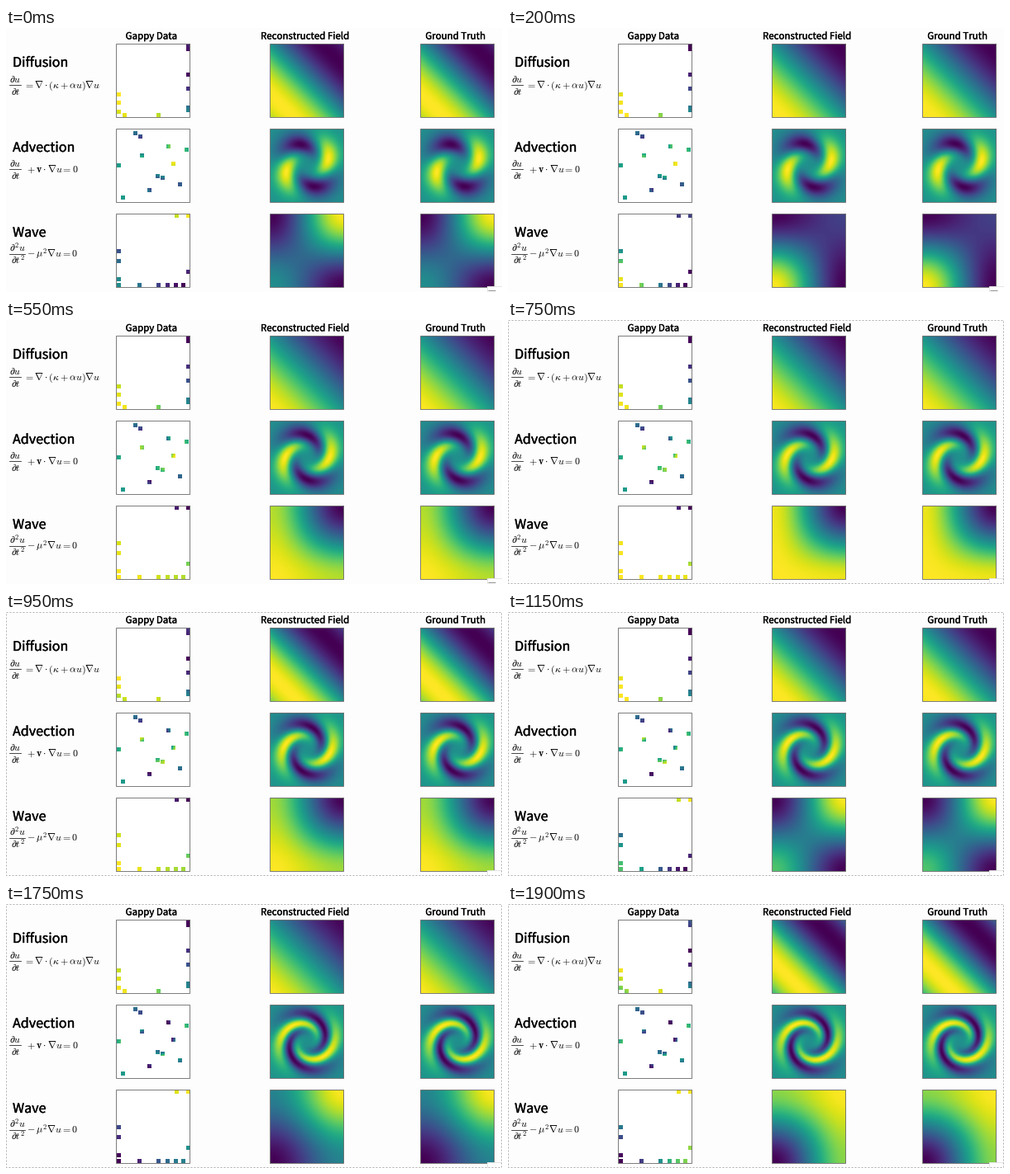
A matplotlib script that plays this animation: 600 by 320 pixels, repeating every 1950 ms.

```python
import numpy as np
import matplotlib.pyplot as plt
from matplotlib.animation import FuncAnimation
from matplotlib.patches import Rectangle
from matplotlib.patheffects import withStroke

W, H, DPI = 600, 320, 100
FRAMES, STEP = 39, 50
PX = 72 / DPI
N = 89
COLS = (133.5, 319.5, 501.5)
ROWS = [19.5 + 103 * i for i in range(3)]
TEXT_FONT = "Noto Sans CJK JP"
TAU = 2 * np.pi
plt.rcParams["mathtext.fontset"] = "cm"

axis = (np.arange(N) + .5) / N
X, Y = np.meshgrid(axis, axis[::-1])
CX, CY = np.cos(np.pi * X), np.cos(np.pi * Y)
R2 = (X - .5)**2 + (Y - .5)**2
THETA = np.arctan2(Y - .5, X - .5)


def diffusion(t):
    """A sharp diagonal band that relaxes and restarts every second."""
    age = (t + 100) % 1000
    k = 1.45 + 1.35 * np.exp(-age / 200)
    return .5 + .5 * np.sin(k * (1 - X - Y))


def advection(t):
    """Four lobes wound up by a vortex."""
    turn = np.radians(70 + .088 * t) * np.exp(-R2 / .31**2)
    rho = R2 / .3**2
    lobe = (rho * np.exp(1 - rho))**1.5
    return .5 + .5 * lobe * np.sin(2 * (THETA + turn))


def wave(t):
    """Two standing modes, rescaled to the full colour range."""
    period = 2060
    p = np.sin(TAU * (t - 100) / period)
    q = -.9 * np.sin(TAU * (t - 320) * np.sqrt(2) / period)
    u = p * (CX + CY) + q * CX * CY
    return (u - u.min()) / np.ptp(u)


def edges(left, bottom, right, top=()):
    lo, hi = 2, N - 3
    return ([(lo, y) for y in left] + [(x, hi) for x in bottom]
            + [(hi, y) for y in right] + [(x, lo) for x in top])


def sensor_mask(points):
    mask = np.zeros((N, N))
    for x, y in points:
        mask[max(y - 2, 0):y + 3, max(x - 2, 0):x + 3] = 1
    return mask


def colors(field, alpha=1):
    rgba = plt.cm.viridis(np.clip(field, 0, 1))
    rgba[..., 3] = alpha
    return rgba


SENSORS = (
    edges((61, 71, 82), (9, 50), (2, 6, 37, 54, 77, 80)),
    ((22, 5), (28, 9), (62, 21), (84, 25), (30, 32), (68, 42), (2, 44),
     (49, 57), (55, 59), (76, 67), (39, 74), (7, 83)),
    edges((45, 57, 79, 86), (27, 50, 61, 71, 80), (70,), (72, 86)))

fig = plt.figure(figsize=(W / DPI, H / DPI), dpi=DPI, facecolor="#fdfdfd")
ax = fig.add_axes([0, 0, 1, 1])
ax.axis("off")


def label(x, y, text, size, ha="left"):
    ax.text(x, y, text, fontsize=size * PX, family=TEXT_FONT, ha=ha,
            va="baseline", path_effects=[withStroke(linewidth=.3 * PX,
                                                    foreground="black")])


def math(x, y, tex, ha):
    ax.text(x, y, f"${tex}$", fontsize=11.9 * PX, ha=ha, va="baseline")


def equation(y, top, bottom, rest, width, right):
    """Fraction with its bar at height y, then the rest, flush right."""
    mid = 4.5 + width / 2
    math(mid, y - 3.5, top, "center")
    math(mid, y + 11.5, bottom, "center")
    ax.plot((4.5, 4.5 + width), (y, y), color="black", lw=.7 * PX, snap=False)
    math(right, y + 3, rest, "right")


for x, text in zip(COLS, ("Gappy Data", "Reconstructed Field",
                          "Ground Truth")):
    label(x + 42, 13.5, text, 11.5, "center")
for y, text in zip(ROWS, ("Diffusion", "Advection", "Wave")):
    label(8, y + 27.5, text, 16.1)

U, T = r"\partial u", r"\partial t"
equation(69.5, U, T, r"=\nabla\cdot(\kappa+\alpha u)\nabla u", 14, 114)
equation(171.5, U, T, r"{}+\mathbf{v}\cdot\nabla u=0", 14, 87.5)
equation(274.5, r"\partial^2 u", r"\partial t^2", r"{}-\mu^2\nabla u=0",
         19, 87.5)

masks = [sensor_mask(points) for points in SENSORS]
images = []
for y in ROWS:
    row = []
    for x in COLS:
        box = dict(xy=(x, y), width=N, height=N, snap=False)
        ax.add_patch(Rectangle(**box, fc="white", ec="none", zorder=1))
        row.append(ax.imshow(np.ones((N, N, 4)), extent=(x, x + N, y + N, y),
                             interpolation="nearest", aspect="auto", zorder=2))
        ax.add_patch(Rectangle(**box, fill=False, ec="#707070", lw=.9 * PX,
                               zorder=3))
    images.append(row)

ax.add_patch(Rectangle((582.5, 313.5), 20, 10, fc="white", ec="#e4e4e4",
                       lw=PX, snap=False, zorder=4))
dash, = ax.plot((584, 592), (318.5, 318.5), color="#909090", lw=PX,
                snap=False, zorder=5)
border = Rectangle((.5, .5), W - 1, H - 1, fill=False, ec="#b0b0b0",
                   lw=PX, ls=(0, (2, 2)), snap=False, zorder=4)
ax.add_patch(border)
ax.set_xlim(0, W)
ax.set_ylim(H, 0)


def update(i):
    t = i * STEP
    for row, solve, mask in zip(images, (diffusion, advection, wave), masks):
        field = solve(t)
        row[0].set_data(colors(field, mask))
        for im in row[1:]:
            im.set_data(colors(field))
    border.set_visible(t >= 600)
    dash.set_visible(t < 600)
    return [im for row in images for im in row] + [border, dash]


anim = FuncAnimation(fig, update, frames=FRAMES, interval=STEP, repeat=True,
                     repeat_delay=0, blit=False)
plt.show()
```
